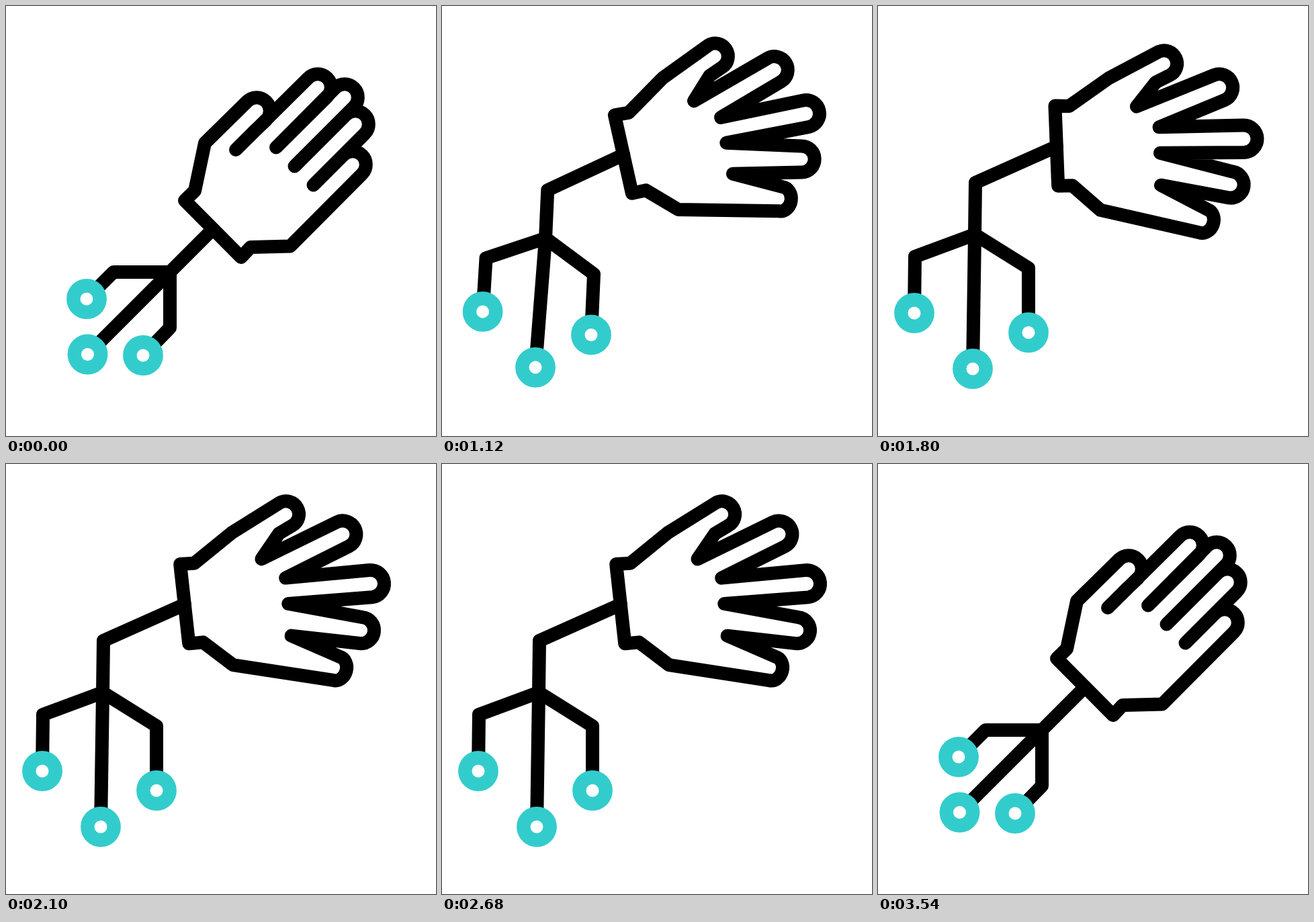
An HTML page with a canvas that plays this animation: 640x640 px, repeating every 3.6 s.

```html
<!DOCTYPE html>
<html lang="en">
<head>
<meta charset="utf-8">
<title>Robotic hand</title>
<style>
  html, body { margin: 0; width: 100%; height: 100%; overflow: hidden; background: #fff; }
  canvas { display: block; width: 640px; height: 640px; }
</style>
</head>
<body>
<canvas id="stage" width="640" height="640"></canvas>
<script>
const ctx = document.getElementById('stage').getContext('2d');
const LOOP = 3600, STEP = 20, LINE = 20, TEAL = '#33cccc';
const DEGREE = Math.PI / 180, SWING = 14.2 * DEGREE, TURN = 36 * DEGREE;

// Each point is [restX, restY, activeX, activeY].
const WRIST = [308, 332, 266, 209];
const ELBOW = [267, 373, 145, 263];
const FORK = [244, 396, 144, 340];
const WIRES = [
  [WRIST, ELBOW, FORK, [121.5, 518.5, 141, 540]],
  [FORK, [160, 396, 55, 373], [120, 436, 54, 457]],
  [FORK, [244, 479, 224, 390], [204, 520, 224, 486]]
];
const HEEL = [[266, 289.5, 256.3, 149.3], [281, 275, 277.3, 147.2], [296, 204, 331, 99]];
const CUFF = [[423, 357.5, 342, 295.5], [364, 359, 296, 264], [350, 374, 275, 267]];
// Finger: both ends of the rounded tip, the points after it, active bulge of the tip.
const FINGERS = [
  { left: [359, 142, 400.4, 51], right: [387, 170, 420.5, 84], bulge: 0.98,
    after: [[370, 186, 401, 97], [342, 214, 377, 136]] },
  { left: [450, 107, 486, 76], right: [478, 135, 506, 111], bulge: 1,
    after: [[402, 210.5, 414, 162.5]] },
  { left: [490, 122, 538, 145], right: [518, 150, 544, 185], bulge: 1,
    after: [[429.5, 238.5, 420, 200.6]] },
  { left: [506, 162, 531, 215.5], right: [534, 190, 529, 254.6], bulge: 1,
    after: [[457.5, 266.5, 426.7, 248]] },
  { left: [502, 222, 500, 275.7], right: [530, 250, 492, 311.3], bulge: 0.83,
    after: CUFF }
];
const SWING_KEYS = [[1200, 0], [1598, 1], [1990, 0], [2382, 1], [2797, 0]];

const lerp = (a, b, p) => a + (b - a) * p;
const at = (point, p) => [lerp(point[0], point[2], p), lerp(point[1], point[3], p)];

function ease(t, from, to) {
  const x = Math.min(1, Math.max(0, (t - from) / (to - from)));
  return x * x * (3 - 2 * x);
}

function swing(t) {
  for (let i = 1; i < SWING_KEYS.length; i++) {
    const [t0, a] = SWING_KEYS[i - 1], [t1, b] = SWING_KEYS[i];
    if (t >= t0 && t < t1) return lerp(a, b, ease(t, t0, t1));
  }
  return 0;
}

function strokeLine(points, width, color) {
  ctx.beginPath();
  points.forEach(point => ctx.lineTo(...point));
  ctx.lineWidth = width;
  ctx.strokeStyle = color;
  ctx.stroke();
}

function drawNode([x, y]) {
  ctx.beginPath();
  ctx.arc(x, y, 19.7, 0, Math.PI * 2);
  ctx.fillStyle = '#fff';
  ctx.fill();
  ctx.lineWidth = 20.4;
  ctx.strokeStyle = TEAL;
  ctx.stroke();
}

function drawWires(p) {
  const wires = WIRES.map(wire => wire.map(point => at(point, p)));
  wires.forEach(wire => strokeLine(wire, LINE, '#000'));
  wires.forEach(wire => drawNode(wire[wire.length - 1]));
}

// Thin signals run from the nodes to the wrist.
function drawSignals(t) {
  if (t <= 0 || t >= 800) return;
  const progress = (t % 400) / 400;
  ctx.save();
  ctx.lineCap = 'butt';
  WIRES.forEach((wire, i) => {
    const points = wire.map(point => at(point, 0)).reverse();
    if (i) points.push(at(WRIST, 0));
    const [x, y] = points[0];
    points.unshift([x - 22, y + 22]);
    let length = 0;
    for (let k = 1; k < points.length; k++) {
      length += Math.hypot(points[k][0] - points[k - 1][0], points[k][1] - points[k - 1][1]);
    }
    const dash = 40;
    ctx.setLineDash([dash, length + 2 * dash]);
    ctx.lineDashOffset = dash - progress * (length + dash);
    strokeLine(points, 4, '#fff');
  });
  ctx.restore();
}

// Blends a hand point relative to the wrist, with the rest pose turned upright.
function handPoint([restX, restY, x, y], p) {
  const dx = restX - WRIST[0], dy = restY - WRIST[1];
  const c = Math.cos(TURN), s = Math.sin(TURN);
  return at([dx * c - dy * s, dx * s + dy * c, x - WRIST[2], y - WRIST[3]], p);
}

function drawHand(p, swingAngle) {
  const lineTo = point => ctx.lineTo(...handPoint(point, p));
  ctx.save();
  ctx.translate(...at(WRIST, p));
  ctx.rotate(swingAngle - TURN * (1 - p));
  ctx.beginPath();
  HEEL.forEach(lineTo);
  for (const finger of FINGERS) {
    const [lx, ly] = handPoint(finger.left, p), [rx, ry] = handPoint(finger.right, p);
    const radius = Math.hypot(rx - lx, ry - ly) / 2;
    ctx.ellipse((lx + rx) / 2, (ly + ry) / 2, radius * lerp(1, finger.bulge, p), radius,
      Math.atan2(lx - rx, ry - ly), -Math.PI / 2, Math.PI / 2);
    finger.after.forEach(lineTo);
  }
  ctx.closePath();
  ctx.lineWidth = LINE;
  ctx.strokeStyle = '#000';
  ctx.stroke();
  ctx.restore();
}

function draw(t) {
  const pose = ease(t, 792, 1200) - ease(t, 3115, 3540);
  ctx.fillStyle = '#fff';
  ctx.fillRect(0, 0, 640, 640);
  ctx.lineCap = ctx.lineJoin = 'round';
  drawWires(pose);
  drawHand(pose, swing(t) * SWING);
  drawSignals(t);
}

const start = performance.now();
function tick() {
  const t = (performance.now() - start) % LOOP;
  draw(Math.floor(t / STEP) * STEP);
  requestAnimationFrame(tick);
}
tick();
</script>
</body>
</html>
```
